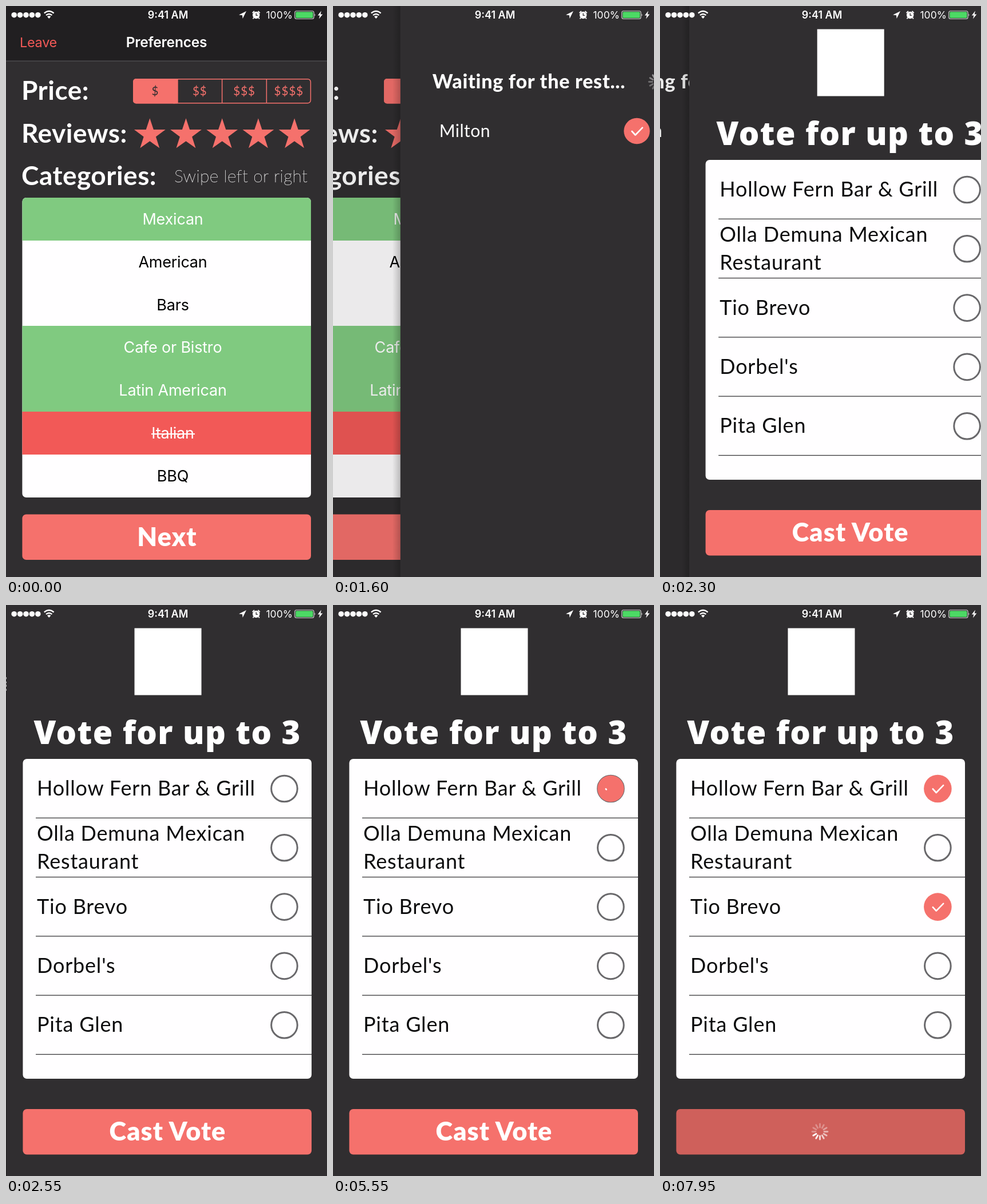
Recreate the animation shown at these times as an HTML page. Size 561 by 998 pixels, loop 8 s.

```html
<!DOCTYPE html>
<html lang="en">
<head>
<meta charset="utf-8">
<title>Dinner vote</title>
<style>
  html, body { margin: 0; width: 100%; height: 100%; overflow: hidden; background: #302e30; }
  svg { display: block; width: 100vw; height: 100vh; }
  text { white-space: pre; fill: #fff; }
  .ui { font-family: Inter, Roboto, sans-serif; }
  .la { font-family: Lato, "Open Sans", sans-serif; }
  .wide { font-family: "Open Sans", Lato, sans-serif; }
</style>
</head>
<body>
<svg id="stage" viewBox="0 0 561 998">
  <defs>
    <linearGradient id="shade"><stop offset="0" stop-opacity="0"/><stop offset="1" stop-opacity=".2"/></linearGradient>
    <clipPath id="rows"><rect x="28.4" y="335" width="504.6" height="524" rx="7"/></clipPath>
  </defs>
  <g id="prefs"></g>
  <g id="waiting"></g>
  <g id="vote"></g>
  <g id="status"></g>
</svg>
<script>
const W = 561, H = 998, LOOP = 8000;
const LEFT = 28.4, INNER = 504.6;
const BG = '#302e30', CORAL = '#f5716c', GREEN = '#80ca80', RED = '#f25957', GRAY = '#69686b';
const CORAL_RGB = [245, 113, 108], PRESSED_RGB = [207, 96, 91];
const PUSH1 = 1440, PUSH2 = 2081;
const $ = id => document.getElementById(id);
const clamp = v => Math.max(0, Math.min(1, v));

function el(parent, tag, attrs, content) {
  const node = document.createElementNS('http://www.w3.org/2000/svg', tag);
  for (const key in attrs) node.setAttribute(key, attrs[key]);
  if (content) node.textContent = content;
  parent.appendChild(node);
  return node;
}
const set = (node, attrs) => { for (const key in attrs) node.setAttribute(key, attrs[key]); };
const rect = (g, x, y, width, height, fill, rx = 0) => el(g, 'rect', { x, y, width, height, fill, rx });
const circle = (g, cx, cy, r, fill) => el(g, 'circle', { cx, cy, r, fill });
const path = (g, d, attrs) => el(g, 'path', { d, fill: 'none', ...attrs });
const label = (g, cls, str, x, y, size, weight, spacing = 0, extra = {}) =>
  el(g, 'text', { class: cls, x, y, 'font-size': size, 'font-weight': weight, 'letter-spacing': spacing, ...extra }, str);
const mid = { 'text-anchor': 'middle' };

function spinner(g, cx, cy) {
  const box = el(g, 'g', { transform: `translate(${cx} ${cy})` });
  const spokes = Array.from({ length: 12 }, (_, i) =>
    path(box, 'M0-7.5V-13.5', { stroke: '#fff', 'stroke-width': 2.8, 'stroke-linecap': 'round', transform: `rotate(${i * 30})` }));
  return { box, turn(t) {
    const head = (Math.floor(t * 12 / 1000) + 9) % 12;
    spokes.forEach((s, i) => s.setAttribute('opacity', Math.max(0.3, 1 - (head - i + 12) % 12 / 10)));
  } };
}

function tick(g, cx, cy) {
  return path(g, 'M-8.6 .5L-2.6 7L9.8-5.8', {
    transform: `translate(${cx} ${cy})`, stroke: '#fff', 'stroke-width': 2.6,
    'stroke-linecap': 'round', 'stroke-linejoin': 'round', pathLength: 1
  });
}

function button(g, y, str) {
  const plate = rect(g, LEFT, y, INNER, 79.5, CORAL, 7);
  const text = label(g, 'la', str, 281.5, y + 55, 45, 900, 1.1, mid);
  const spin = spinner(g, 279.5, y + 39.5);
  return (busy, dark, t) => {
    plate.setAttribute('fill', `rgb(${CORAL_RGB.map((c, i) => Math.round(c + (PRESSED_RGB[i] - c) * dark))})`);
    text.setAttribute('opacity', 1 - busy);
    spin.box.setAttribute('opacity', busy);
    spin.turn(t);
  };
}

// Each page has its own backdrop, plus a left edge shadow where it slides in.
function page(id, shadow) {
  const g = $(id);
  if (shadow) rect(g, -14, 0, 14, H, 'url(#shade)');
  rect(g, 0, 0, W, H, BG);
  return g;
}

function buildPrefs() {
  const g = page('prefs');
  const bar = el(g, 'g', {});
  rect(bar, 0, 0, W, 96, '#211f21');
  rect(bar, 0, 95.5, W, 1.2, '#555356');
  label(bar, 'ui', 'Leave', 24, 71.5, 23.5, 400, -.3, { style: `fill:${RED}` });
  label(bar, 'ui', 'Preferences', 280.5, 71.5, 24.5, 600, -.2, mid);

  ['Price:', 'Reviews:', 'Categories:'].forEach((s, i) =>
    label(g, 'la', s, 27, 164 + i * 74.7, 46, 700, .5));
  label(g, 'la', 'Swipe left or right', 294, 308, 30, 100, .35, { stroke: '#fff', 'stroke-width': .3 });

  rect(g, 222, 127, 78, 43.5, CORAL, 5);
  rect(g, 292, 127, 8, 43.5, CORAL);
  set(rect(g, 222.8, 127.8, 309.6, 42, 'none', 5), { stroke: CORAL, 'stroke-width': 1.5 });
  for (let i = 0; i < 4; i++) {
    if (i) rect(g, 221.5 + i * 77.7, 127.5, 1.5, 42.5, CORAL);
    label(g, 'la', '$'.repeat(i + 1), 261 + i * 77.8, 156, 20.5, 400, 1,
      { ...mid, style: `fill:${i ? CORAL : BG}` });
  }

  const star = Array.from({ length: 10 }, (_, i) => {
    const r = i % 2 ? 11.2 : 28.8, a = i * Math.PI / 5;
    return `${(r * Math.sin(a)).toFixed(2)},${(-r * Math.cos(a)).toFixed(2)}`;
  }).join(' ');
  for (let i = 0; i < 5; i++)
    el(g, 'polygon', { points: star, fill: CORAL, transform: `translate(${251.3 + i * 63.2} 225)` });

  const table = el(g, 'g', { 'clip-path': 'url(#rows)', 'shape-rendering': 'crispEdges' });
  rect(table, 28, 335, 506, 524, '#fffeff');
  [['Mexican', GREEN], ['American'], ['Bars'], ['Cafe or Bistro', GREEN],
   ['Latin American', GREEN], ['Italian', RED], ['BBQ']].forEach(([name, color], i) => {
    const y = 335 + i * 74.8;
    if (color) rect(table, 28, y, 506, 75, color);
    label(table, 'ui', name, 291.5, y + 47, 27, 400, -.2, { ...mid, style: `fill:${color ? '#fff' : '#000'}` });
  });
  rect(table, 254, 746.5, 76, 2, '#fff');

  const press = button(g, 888.5, 'Next');
  const dim = rect(g, 0, 0, W, H, '#000');
  return { g, bar, press, dim };
}

function buildWaiting() {
  const g = page('waiting', true);
  label(g, 'la', 'Waiting for the rest...', 56, 144, 34, 800, .75);
  const spin = spinner(g, 448, 132.5);
  label(g, 'la', 'Milton', 68, 229, 30, 400, .5);
  circle(g, 413.3, 218.5, 22.7, CORAL);
  tick(g, 413.3, 218.5);
  const dim = rect(g, 0, 0, W, H, '#000');
  return { g, spin, dim };
}

function buildVote() {
  const g = page('vote', true);
  rect(g, 223.5, 40.5, 117, 117, '#fff');
  label(g, 'wide', 'Vote for up to 3', 281, 243, 56, 800, 1.4, mid);
  rect(g, LEFT, 269, INNER, 559, '#fffeff', 7);
  const checks = [['Hollow Fern Bar & Grill'], ['Olla Demuna Mexican', 'Restaurant'],
    ['Tio Brevo'], ["Dorbel's"], ['Pita Glen']].map((lines, i) => {
    const cy = 321 + i * 103.3;
    lines.forEach((s, k) => label(g, 'la', s, 53, cy + (lines.length > 1 ? -12.5 + k * 49 : 12), 36, 400, .8,
      { style: 'fill:#0b0b0c' }));
    rect(g, 51, cy + 50.6, 482, 1.3, '#39383a');
    const ring = circle(g, 485.4, cy, 22.8, 'none');
    set(ring, { stroke: GRAY, 'stroke-width': 3 });
    const disc = circle(g, 485.4, cy, 0, CORAL), mark = tick(g, 485.4, cy);
    return age => {
      const grow = clamp(age / 190), draw = clamp((age - 140) / 200);
      disc.setAttribute('r', 24.3 * (1 - (1 - grow) ** 2));
      set(mark, { 'stroke-dasharray': `${draw} 2`, opacity: draw > 0 ? 1 : 0 });
      ring.setAttribute('opacity', grow < 1 ? 1 : 0);
    };
  });
  return { g, checks, press: button(g, 881, 'Cast Vote') };
}

function buildStatus() {
  const g = $('status'), white = '#fff';
  for (let i = 0; i < 5; i++) circle(g, 14.2 + i * 10.4, 15.7, 4.8, white);
  path(g, 'M66.8 12.6Q75.2 5.6 83.6 12.6M70 16.2Q75.2 11.8 80.4 16.2', { stroke: white, 'stroke-width': 2.4 });
  path(g, 'M72 18.6Q75.2 16 78.4 18.6L75.2 22Z', { fill: white });
  label(g, 'ui', '9:41 AM', 283, 22, 18, 600, 0, mid);
  path(g, 'M420 9L407 15.6L413 16.2L413.6 22Z', { fill: white });
  circle(g, 437.2, 16, 6.2, white);
  path(g, 'M437.2 12.4V16.4H440', { stroke: BG, 'stroke-width': 1.3 });
  path(g, 'M430.6 12.2L434 9M440.4 9L443.8 12.2M433 20.5L431.5 22.4M441.4 20.5L442.9 22.4', { stroke: white, 'stroke-width': 1.8 });
  label(g, 'ui', '100%', 454.5, 22, 17.5, 400);
  set(rect(g, 504.7, 8.7, 33.4, 13.8, 'none', 3), { stroke: '#d5d5d5', 'stroke-width': 1.1 });
  rect(g, 506.3, 10.3, 30.2, 10.6, '#4cd964', 1.5);
  path(g, 'M539.4 13.2Q541.6 15.6 539.4 18Z', { fill: '#d5d5d5' });
  path(g, 'M551 8.6L544.8 16.4H548.4L547 22.6L553.4 14.6H549.6Z', { fill: white });
}

const prefs = buildPrefs(), waiting = buildWaiting(), vote = buildVote();
buildStatus();

// Critically damped spring, as in a navigation push.
function push(t, start) {
  if (t <= start) return 0;
  if (t > start + 640) return 1;
  const x = 18.2 * (t - start) / 1000;
  return 1 - (1 + x) * Math.exp(-x);
}

function place(g, x, shown) {
  set(g, { transform: `translate(${x} 0)`, visibility: shown ? 'visible' : 'hidden' });
}

function render(t) {
  const a = push(t, PUSH1), b = push(t, PUSH2);
  place(prefs.g, -.3 * W * a, a < 1);
  place(waiting.g, W * (1 - a) - .3 * W * b, a > 0 && b < 1);
  place(vote.g, W * (1 - b), b > 0);
  prefs.dim.setAttribute('opacity', .1 * a);
  waiting.dim.setAttribute('opacity', .1 * b);
  prefs.bar.setAttribute('opacity', clamp(1 - a / .6));

  const dark = clamp((t - 980) / 100) - clamp((t - 1400) / 160);
  prefs.press(clamp((t - 980) / 60), dark, t);
  waiting.spin.turn(t);
  const cast = t - 7500;
  vote.press(clamp(cast / 60), clamp(cast / 100), t);
  vote.checks.forEach((check, i) => check(t - (i === 0 ? 5400 : i === 2 ? 6300 : Infinity)));
}

const began = performance.now();
function loop() {
  render((performance.now() - began) % LOOP);
  requestAnimationFrame(loop);
}
loop();
</script>
</body>
</html>
```
